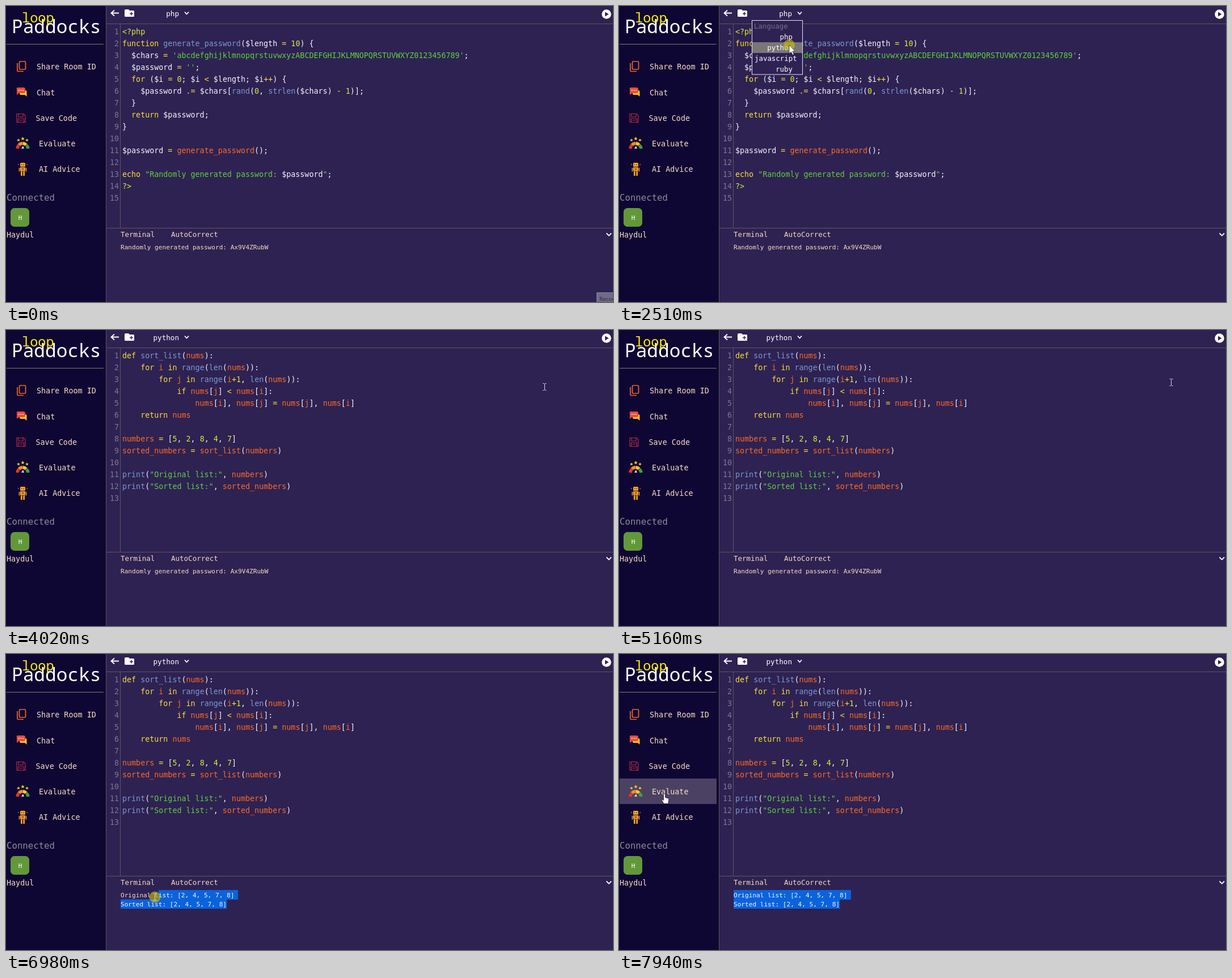
Write an HTML page that moves like this. It is 1070 px wide and 523 px high and loops after 8 s.

```html
<!DOCTYPE html>
<html lang="en">
<head>
<meta charset="utf-8">
<title>Code room</title>
<style>
  html, body { margin: 0; width: 100%; height: 100%; overflow: hidden; background: #2e2253; }
  svg { display: block; width: 100%; height: 100%; }
  text { font-family: "DejaVu Sans Mono", "Noto Sans Mono", monospace; white-space: pre; }
  .logo { font-family: "Noto Sans Mono", "DejaVu Sans Mono", monospace; font-weight: 300; }
  .code { font-size: 13.35px; fill: #f6f4fa; }
  .nav { font-size: 13.4px; fill: #f7dcc3; }
  .tab { font-size: 12.5px; fill: #f7dcc3; }
  .out { font-size: 11.1px; fill: #f7dcc3; }
  .pick { font-size: 12.6px; fill: #fff; }
  .num { font-size: 13.35px; fill: #7d7891; text-anchor: end; }
  .str { fill: #5ed03c; }
  .lit { fill: #d6ee35; }
  .key { fill: #f9de3c; }
  .fn { fill: #7d98cf; }
  .var { fill: #f6f4fa; }
  .id { fill: #ff6a22; }
</style>
</head>
<body>
<svg viewBox="0 0 1070 523" preserveAspectRatio="none">
  <rect width="1070" height="523" fill="#2e2253"/>
  <rect width="176" height="523" fill="#0f0733"/>
  <path d="M176.5 0V523M177 31.5H1070M177 392.5H1070" stroke="#5c5a54" fill="none"/>
  <path d="M201.5 32V392" stroke="#5c5862"/>

  <!-- sidebar -->
  <text class="logo" x="10" y="48" font-size="32.8" fill="#fff">Paddocks</text>
  <text class="logo" x="28" y="29" font-size="23.6" fill="#fff200">loop</text>
  <path d="M1 67.5H172" stroke="#7d7d66"/>
  <rect id="hover" x="1" width="171" height="45" fill="#4b4163"/>
  <g fill="none" stroke="#ea6a2a" stroke-width="1.7">
    <rect x="23.5" y="98" width="11" height="14" rx="1.5"/>
    <path d="M20 101V114Q20 115.5 21.5 115.5H31"/>
  </g>
  <path d="M24 149H34Q36.5 149 36.5 151.5V160L33 157H26Q24 157 24 155Z" fill="#fbc02d"/>
  <path d="M21 144H31Q34 144 34 147V151Q34 154 31 154H23L19 157V147Q18 144 21 144Z" fill="#ee4b36"/>
  <path d="M22 149H31" stroke="#fff" stroke-width="1.6" stroke-dasharray="1.8 1.8"/>
  <g fill="none" stroke="#b32c44" stroke-width="1.2">
    <path d="M19 190.5H31L34 193.5V205.5H19Z"/>
    <path d="M22 191V196H30V191M21.5 205V199H31.5V205M23.5 202H29.5"/>
  </g>
  <g id="stars" fill="#fdc52e"></g>
  <g fill="none" stroke-width="5.5">
    <path d="M20 252A9.5 9.5 0 0 1 22.5 246" stroke="#e5342c"/>
    <path d="M22.8 245.7A9.5 9.5 0 0 1 29 242.5" stroke="#f58a2a"/>
    <path d="M29.5 242.5A9.5 9.5 0 0 1 35.5 245.5" stroke="#fdc52e"/>
    <path d="M36 246A9.5 9.5 0 0 1 39 252" stroke="#3fa046"/>
  </g>
  <path d="M27 252L30 247 32 252Z" fill="#d9d3e2"/>
  <g fill="#f6a32b">
    <rect x="25" y="277" width="9" height="7" rx="1.5"/>
    <rect x="25" y="285" width="9" height="6.5"/>
    <path d="M26 292H28.7V300H26ZM30.3 292H33V300H30.3ZM22.7 286H24.2V292.5H22.7ZM34.8 286H36.3V292.5H34.8Z"/>
    <path d="M21 279H22.5V281H21ZM36.5 279H38V281H36.5Z" fill="#d9502c"/>
  </g>
  <path d="M27 280.5H28.5M30.5 280.5H32M27.5 288H31.5" stroke="#5a2a1c" stroke-width="1.5"/>
  <g class="nav">
    <text x="54" y="112">Share Room ID</text>
    <text x="54" y="157.5">Chat</text>
    <text x="52.5" y="202.5">Save Code</text>
    <text x="58" y="247.5">Evaluate</text>
    <text x="58" y="292.5">AI Advice</text>
    <text x="1" y="408.5">Haydul</text>
  </g>
  <text x="1" y="343.5" font-size="15.7" fill="#8f8b98">Connected</text>
  <rect x="8" y="357" width="33" height="33" rx="7" fill="#62983a"/>
  <text x="25" y="378" font-size="11" fill="#fff" text-anchor="middle">H</text>

  <!-- top bar -->
  <path d="M199 12.5H186M191 7.5L185.5 12.5L191 17.5" fill="none" stroke="#fff" stroke-width="1.8"/>
  <path d="M211 6H216L218 8H224.5Q226 8 226 9.5V17.5Q226 19 224.5 19H210.5Q209 19 209 17.5V7.5Q209 6 211 6Z" fill="#fff"/>
  <path d="M221 10.5V16.5M218 13.5H224" stroke="#2e2253" stroke-width="1.5"/>
  <text id="lang" class="pick" x="305" y="17.5" text-anchor="end">php</text>
  <path d="M315 10.5L318.5 14.5L322 10.5M1058.5 401.5L1062.8 405.8L1067 401.5" fill="none" stroke="#fff" stroke-width="1.8"/>
  <circle cx="1058.5" cy="14.5" r="8.3" fill="#fff"/>
  <path d="M1056 10.5V18.5L1062.5 14.5Z" fill="#2e2253"/>

  <!-- editor -->
  <g id="gutter"></g>
  <g id="php" class="code"></g>
  <g id="py" class="code"></g>
  <rect id="caret" x="205" width="1.2" height="19" fill="#f6f4fa"/>

  <!-- terminal -->
  <text class="tab" x="202" y="407.5">Terminal</text>
  <text class="tab" x="291" y="407.5">AutoCorrect</text>
  <rect id="sel1" y="417" height="17" fill="#0b63dc"/>
  <rect id="sel2" y="433.5" height="16.5" fill="#0b63dc"/>
  <text id="out1" class="out" x="202" y="429.5"></text>
  <text id="out2" class="out" x="202" y="446"></text>

  <!-- language menu -->
  <g id="menu">
    <rect x="234.5" y="25.5" width="89" height="95.5" fill="#2e2253" stroke="#e8e6ee"/>
    <rect id="mark" x="235" width="88" height="19" fill="#7a7678"/>
    <g class="pick" style="font-size:12.4px">
      <text x="238" y="40" fill="#777184">Language</text>
      <text x="306" y="59" text-anchor="end">php</text>
      <text x="306" y="78" text-anchor="end">python</text>
      <text x="239" y="97">javascript</text>
      <text x="306" y="115.5" text-anchor="end">ruby</text>
    </g>
  </g>

  <g id="tip">
    <rect x="1041.5" y="506.5" width="60" height="30" fill="#716b86" stroke="#8a8599"/>
    <text x="1046" y="521" font-size="9.8" fill="#2b2638" style="font-family:'Open Sans',sans-serif">Record</text>
  </g>

  <g id="cursor">
    <circle id="press" r="10" fill="#c8be0a" opacity=".62"/>
    <path id="arrow" d="M0 0V15L3.5 12 6 17.5 8.3 16.5 6 11H10.5Z" fill="#fff" stroke="#15102a" stroke-width=".7"/>
    <path id="beam" d="M-3 -6H-.7M.7 -6H3M0 -5.5V5.5M-3 6H-.7M.7 6H3" fill="none" stroke="#dcd9e4"/>
    <path id="hand" d="M-1.5 1.5A1.5 1.5 0 0 1 1.5 1.5V6.5L6.3 7.8Q8 8.3 7.8 10.3L6.8 17.5H-.8L-4.3 12Q-5 10.2 -3.3 10.2L-1.5 11.5Z" fill="#fff" stroke="#15102a" stroke-width=".8"/>
  </g>
</svg>
<script>
const LOOP = 8000, ROW = 21, COL = 6.69, LEFT = 202;
const $ = id => document.getElementById(id);
const show = (id, on) => $(id).style.display = on ? '' : 'none';
const set = (id, attrs) => { for (const k in attrs) $(id).setAttribute(k, attrs[k]); };

const PHP = `<?php
function generate_password($length = 10) {
  $chars = 'abcdefghijklmnopqrstuvwxyzABCDEFGHIJKLMNOPQRSTUVWXYZ0123456789';
  $password = '';
  for ($i = 0; $i < $length; $i++) {
    $password .= $chars[rand(0, strlen($chars) - 1)];
  }
  return $password;
}

$password = generate_password();

echo "Randomly generated password: $password";
?>`;
const PY = `def sort_list(nums):
    for i in range(len(nums)):
        for j in range(i+1, len(nums)):
            if nums[j] < nums[i]:
                nums[i], nums[j] = nums[j], nums[i]
    return nums

numbers = [5, 2, 8, 4, 7]
sorted_numbers = sort_list(numbers)

print("Original list:", numbers)
print("Sorted list:", sorted_numbers)`;

const TOKEN = /(?<str>"[^"]*"|'[^']*')|(?<lit><\?php|\?>|\b\d+)|(?<key>\b(?:function|for|return|echo|def|in|if)\b|[=<+.-]+)|(?<fn>(?<=function |def )\w+|\b(?:rand|strlen|range|len|print)\b)|(?<var>\$\w+)|(?<id>[a-z]\w*)/g;
const esc = s => s.replace(/</g, '&lt;');
const span = (c, s) => `<tspan class="${c}">${s}</tspan>`;

function paint(line) {
  return line.replace(TOKEN, (s, ...rest) => {
    const groups = rest[rest.length - 1];
    const kind = Object.keys(groups).find(k => groups[k] !== undefined);
    let body = esc(s);
    if (kind === 'str') body = body.replace(/\$\w+/, v => span('var', v));
    return span(kind, body);
  });
}

function fill(id, src) {
  $(id).innerHTML = src.split('\n')
    .map((l, i) => `<text x="205" y="${50 + i * ROW}">${paint(l)}</text>`).join('');
}
fill('php', PHP);
fill('py', PY);
$('gutter').innerHTML = Array.from({ length: 15 },
  (_, i) => `<text class="num" x="199" y="${50 + i * ROW}">${i + 1}</text>`).join('');

function star(cx, cy, r) {
  const pts = Array.from({ length: 10 }, (_, i) => {
    const a = i * Math.PI / 5 - Math.PI / 2, d = i % 2 ? r * .45 : r;
    return (cx + d * Math.cos(a)).toFixed(1) + ',' + (cy + d * Math.sin(a)).toFixed(1);
  });
  return `<polygon points="${pts.join(' ')}"/>`;
}
$('stars').innerHTML = star(22, 237, 3) + star(29.5, 234.5, 3.4) + star(37, 237, 3);

// pointer path: time, x, y
const PATH = [
  [0, 1085, 545], [60, 1060, 514], [300, 936, 450], [560, 610, 245], [820, 318, 36],
  [960, 323, 12], [1240, 323, 12], [1450, 313, 19], [1630, 307, 44], [1900, 303, 60],
  [2150, 300, 69], [3570, 300, 69], [3630, 330, 76], [3780, 570, 104], [4020, 950, 101],
  [4200, 1026, 76], [4340, 1040, 57], [4450, 1063, 21], [4640, 1062, 17], [5030, 1062, 17],
  [5090, 1040, 40], [5350, 799, 234], [5470, 799, 234], [5560, 743, 271], [5750, 632, 350],
  [6190, 434, 438], [6330, 425, 443], [6440, 405, 448], [6560, 394, 443], [6800, 312, 437],
  [6980, 264, 430], [7100, 190, 425], [7170, 212, 425], [7430, 212, 425], [7490, 206, 405],
  [7640, 173, 303], [7800, 96, 256], [7940, 80, 247], [LOOP, 80, 247]
];
const CLICKS = [[1080, 1200], [2510, 2760], [4780, 4890], [6560, 7130]];
const CARETS = [[890, 1140, 15], [2760, 3250, 1], [3250, 3780, 13], [4310, 4840, 13]];
const at = (list, t) => list.find(([a, b]) => t >= a && t < b);

function pointer(t) {
  const i = PATH.findIndex(p => p[0] > t);
  const [t0, x0, y0] = PATH[i - 1], [t1, x1, y1] = PATH[i];
  const k = (t - t0) / (t1 - t0);
  return [x0 + (x1 - x0) * k, y0 + (y1 - y0) * k].map(Math.round);
}

function shape(t, x, y, menu) {
  if (x < 172 && y > 85 && y < 310 || x > 1048 && y < 26) return 'hand';
  if (menu || y < 32 || x < 178 || t > 2000 && t < 2760) return 'arrow';
  return 'beam';
}

// writes a terminal line with its selected tail in white, from column n on
function print(id, s, n) {
  $(id).innerHTML = s.slice(0, n) + span('var', s.slice(n));
}

function terminal(t, x, y) {
  const ran = t >= 6260, drag = t >= 6560;
  const upper = drag && (t >= 7100 || y < 433.5);
  const line1 = ran ? 'Original list: [2, 4, 5, 7, 8]' : 'Randomly generated password: Ax9V4ZRubW';
  const line2 = ran ? 'Sorted list: [2, 4, 5, 7, 8]' : '';
  const col = t >= 7100 ? 0 : Math.max(0, Math.ceil((x - LEFT) / COL));
  const n1 = upper ? col : line1.length;
  const n2 = upper ? 0 : drag ? Math.min(col, line2.length) : line2.length;
  print('out1', line1, n1);
  print('out2', line2, n2);
  set('sel1', { x: LEFT + n1 * COL, width: upper ? 409 - LEFT - n1 * COL : 0 });
  set('sel2', { x: LEFT + n2 * COL, width: (line2.length - n2) * COL });
}

function draw(t) {
  const [x, y] = pointer(t);
  const menu = t >= 1200 && t < 2570;
  const python = t >= 2570, loaded = t >= 3250;

  show('tip', t < 60);
  show('menu', menu);
  set('mark', { y: t > 1600 && y > 64 ? 64 : 45 });
  $('lang').textContent = python ? 'python' : 'php';
  show('php', !python);
  show('py', loaded);
  const lines = loaded ? 13 : python ? 1 : 15;
  [...$('gutter').children].forEach((n, i) => n.style.display = i < lines ? '' : 'none');

  const caret = at(CARETS, t);
  show('caret', caret);
  if (caret) set('caret', { y: 15 + caret[2] * ROW });
  terminal(t, x, y);

  const row = Math.floor((y - 85) / 45);
  const over = x < 172 && row >= 0 && row < 5;
  show('hover', over);
  if (over) set('hover', { y: 85 + row * 45 });

  const kind = shape(t, x, y, menu);
  const snap = kind === 'beam' ? .5 : 0;
  set('cursor', { transform: `translate(${x - snap} ${y - snap})` });
  for (const k of ['arrow', 'beam', 'hand']) show(k, k === kind);
  show('press', at(CLICKS, t));
}

const start = performance.now();
function tick() {
  draw((performance.now() - start) % LOOP);
  requestAnimationFrame(tick);
}
tick();
</script>
</body>
</html>
```
